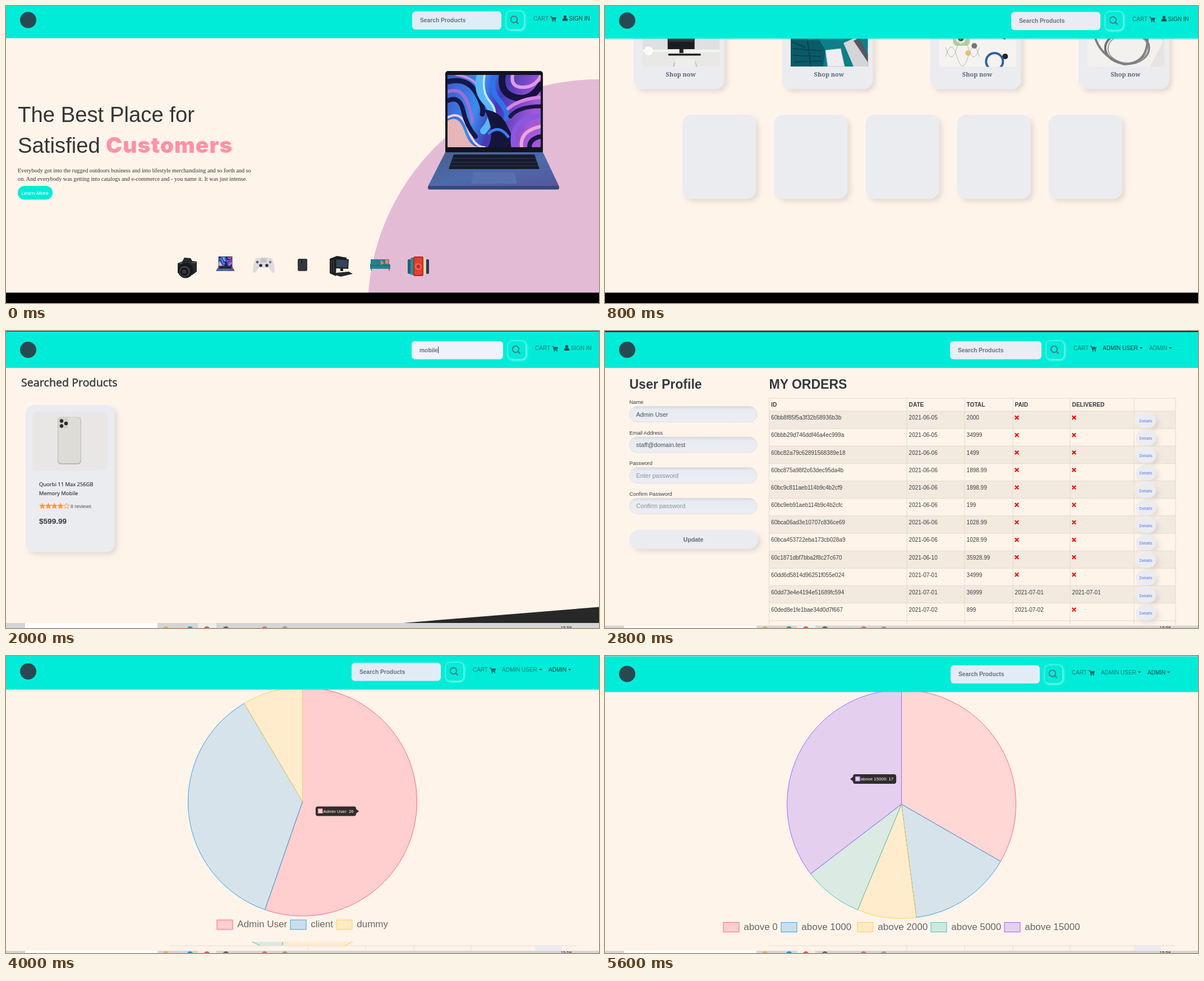
Recreate the animation shown at these times as an HTML page. Size 1057x530 px, loop 6 s.

```html
<!DOCTYPE html>
<html lang="en">
<head>
<meta charset="utf-8">
<title>Shop tour</title>
<style>
html, body { margin: 0; width: 100%; height: 100%; overflow: hidden; background: #fff4e9; }
#stage { display: block; width: 100%; height: 100%; font-family: "Liberation Sans", Arial, sans-serif; }
.b { font-weight: 700; }
.serif { font-family: "Liberation Serif", Georgia, serif; }
.slab { font-family: "Noto Serif", serif; font-weight: 700; }
.black { font-family: Inter, "Liberation Sans", sans-serif; font-weight: 900; letter-spacing: .026em; }
.hum { font-family: "Noto Sans", "Open Sans", sans-serif; font-weight: 500; stroke: #343a40; stroke-width: .02em; }
.mid { text-anchor: middle; }
</style>
</head>
<body>
<svg id="stage" viewBox="0 0 1057 530" preserveAspectRatio="none"></svg>
<script>
const TEAL = '#00ecd8', CREAM = '#fff4e9', PINK = '#e4bbd5', CARD = '#ebecf0', INK = '#343a40';
const STEP = 400, LOOP = 6000;

// ---- primitives
const R = (x, y, w, h, fill, rx = 0, more = '') =>
  `<rect x="${x}" y="${y}" width="${w}" height="${h}" rx="${rx}" fill="${fill}" ${more}/>`;
const C = (x, y, r, fill, more = '') => `<circle cx="${x}" cy="${y}" r="${r}" fill="${fill}" ${more}/>`;
const P = (d, fill, more = '') => `<path d="${d}" fill="${fill}" ${more}/>`;
const L = (d, color, w = 1) => P(d, 'none', `stroke="${color}" stroke-width="${w}" stroke-linecap="round"`);
const T = (x, y, s, size, fill = INK, cls = '') =>
  `<text x="${x}" y="${y}" font-size="${size}" fill="${fill}" class="${cls}">${s}</text>`;
const G = (tf, s) => `<g transform="${tf}">${s}</g>`;
const clip = (x, y, w, h, s) => `<svg x="${x}" y="${y}" width="${w}" height="${h}">${s}</svg>`;
const SOFT = 'filter="url(#soft)"';
const page = body => R(0, 0, 1057, 530, CREAM) + body;

const defs = `<defs>
<filter id="soft" x="-30%" y="-30%" width="170%" height="170%">
  <feDropShadow dx="-3" dy="-3" stdDeviation="3" flood-color="#fff" flood-opacity=".3"/>
  <feDropShadow dx="5" dy="5" stdDeviation="4.5" flood-color="#b9b2b4" flood-opacity=".4"/></filter>
<filter id="glow" x="-40%" y="-40%" width="180%" height="180%">
  <feDropShadow dx="1" dy="1" stdDeviation="2" flood-color="#c8fff8" flood-opacity=".8"/></filter>
<linearGradient id="field" x2="0" y2="1"><stop stop-color="#d3d8e2"/><stop offset=".2" stop-color="#e8ebf2"/><stop offset="1" stop-color="#eceef3"/></linearGradient>
<linearGradient id="metal" x2=".9" y2="1"><stop stop-color="#4a5d8c"/><stop offset=".55" stop-color="#4c6bab"/><stop offset="1" stop-color="#56579c"/></linearGradient>
<linearGradient id="wave" x2="1" y2=".25"><stop stop-color="#3f57c8"/><stop offset=".4" stop-color="#3a8cf0"/><stop offset=".6" stop-color="#4338b4"/><stop offset="1" stop-color="#a458d8"/></linearGradient>
</defs>`;

// ---- header and task bar
const cartIcon = (x, y) => G(`translate(${x} ${y})`,
  L('M.5 .8H2.4L4 7H9.5', '#1d5d5b', 1.3) + P('M2.6 1.8H11L9.8 6H3.6Z', '#1d5d5b') + C(4.5, 9, 1.1, '#1d5d5b') + C(9, 9, 1.1, '#1d5d5b'));
const userIcon = (x, y, c) => C(x, y - 2.4, 2.6, c) + P(`M${x - 4.6} ${y + 5}v-2q0-2.6 2.6-2.6h4q2.6 0 2.6 2.6v2z`, c);
const caret = (x, y) => P(`M${x} ${y}h5.6l-2.8 3z`, '#1d4d4a');

function header(h, { bx = 724, bw = 159, cx = 940, admin = false, dark = 2, typed = '', field = '#e2ecf6' } = {}) {
  const y = h - 47.5, nav = h - 31.4, gx = bx + bw + 23;
  const tone = n => n === dark ? '#17423f' : '#157a73';
  let s = R(0, 0, 1057, h + .4, TEAL) + C(39.5, h - 32, 14.5, '#274a52')
    + R(bx, y, bw, 32.5, field, 6)
    + T(bx + 14, h - 28, typed || 'Search Products', 10.25, '#67717e', 'b')
    + R(bx + bw + 8.5, y - .5, 32, 33, TEAL, 8, 'stroke="#6ff5e9" stroke-width=".8" filter="url(#glow)"')
    + C(gx - .5, h - 33, 5.7, 'none', 'stroke="#4a7f8a" stroke-width="2"')
    + L(`M${gx + 4} ${h - 28.5}l3 3`, '#4a7f8a', 2.2)
    + T(cx, nav, 'CART', 10, tone(1)) + cartIcon(cx + 30, nav - 7.5);
  if (typed) s += R(bx + 14.5 + typed.length * 5.45, h - 38, 1, 12, '#333');
  return s + (admin
    ? T(cx + 52, nav, 'ADMIN USER', 10, tone(2)) + caret(cx + 118, nav - 5)
      + T(cx + 135, nav, 'ADMIN', 10, tone(3)) + caret(cx + 170, nav - 5)
    : userIcon(cx + 56.5, nav - 4, '#1d4d4a') + T(cx + 63.5, nav, 'SIGN IN', 10, tone(2)));
}
const WIDE = { bx: 615, bw: 163, cx: 835, admin: true, dark: 3, field: '#e9edf4' };
const SLIM = { bx: 616, bw: 159, cx: 832, admin: true, dark: 3 };
const GUEST = { bx: 723, bw: 163, cx: 943, dark: 0, field: '#eef2fb' };

function taskbar(y, shift = 0) {
  const dots = [[285, '#d8b35c'], [328, '#2196b8'], [358, '#e2574c'], [392, '#5a6573'], [461, '#cf6e84'], [497, '#9a9a9a']];
  return clip(0, y, 1057, 530 - y, G(`translate(0 ${-y})`,
    R(0, y, 1057, 30, '#d5d5d5') + R(34, y, 236, 30, '#fff') + R(342, y, 33, 30, '#eee')
    + dots.map(([x, c]) => C(x, 532.5 + shift, 5.5, c)).join('') + T(988.5, 532 + shift, '15:58', 8, '#222')));
}

// ---- home page
const wallpaper = () => R(0, 0, 166, 129, 'url(#wave)')
  + P('M0 82Q20 70 30 100T58 129H0Z', '#e6b6b8') + L('M0 76Q24 62 36 96T66 129', '#e9d2e6', 4)
  + L('M0 12Q34 4 50 30T62 70', '#16184a', 9) + L('M0 30Q24 22 34 46T44 84', '#9a6fd8', 6) + L('M0 46Q22 36 28 64T50 110', '#17164a', 8)
  + L('M16 0Q48 4 60 28', '#d58ae0', 4) + L('M58 0Q50 30 70 50T64 100', '#58b8fa', 12) + L('M66 0Q60 30 76 48T78 92', '#c4e6ff', 4)
  + L('M84 0Q74 26 92 46T104 78', '#2c74ea', 9) + P('M66 62Q92 64 104 86T122 129H72Q86 104 66 62Z', '#15153c')
  + L('M74 104Q92 88 108 110', '#3d7cf2', 5) + L('M98 0Q92 32 120 40T166 18', '#16123e', 12) + L('M116 0Q112 22 134 22T166 2', '#e39be6', 6)
  + L('M108 60Q130 42 166 40', '#d884e4', 6) + L('M112 74Q126 56 166 56', '#1c1448', 7) + L('M118 129Q112 90 140 80T166 72', '#8a58e0', 9)
  + L('M132 129Q128 100 166 92', '#f0a4d4', 6) + L('M146 129Q146 114 166 110', '#1c1448', 8);

const laptop = () => R(783, 116, 174, 148, '#12141f', 5) + clip(787, 123, 166, 129, wallpaper())
  + P('M783 261H957L986 322H752Z', 'url(#metal)') + R(752, 321, 234, 6.5, '#34497c', 3)
  + P('M798 265H942L951 291H789Z', '#171b2c') + L('M796 272H945M794 279H947M792 285H949', '#3a4564', .8)
  + P('M834 297H906L911 317H829Z', '#5871ad');

const wares = () =>
  P('M306 459l8-3 4-7 11 1 3 5 8 1v18l-8 6-16 2-10-6z', '#26282b') + L('M309 459h6M331 458h7', '#55585c', 1.4)
  + C(320, 472, 13.5, '#17191b') + C(318.5, 473.5, 9.5, '#44484d') + C(318, 474, 7.5, '#15161a') + C(317.5, 474, 4, '#39304a')
  + G('translate(267.5 432.5) scale(.142 .124)', laptop())
  + P('M446 450q14-3 27 0 6 8 6 23-1 5-5 2l-6-8h-17l-6 8q-4 3-5-2 0-15 6-23z', '#dcdcde') + R(454, 450, 11, 8, '#c5c5c9', 2)
  + C(454, 463, 2.8, '#333') + C(465, 463, 2.8, '#333') + C(448, 457, 2.2, '#555') + C(471, 457, 2.2, '#777')
  + R(520, 451, 17, 22, '#33363c', 2.5) + R(522, 453, 6, 6, '#1b1c20', 1.5) + C(524, 455, 1, '#777') + C(524, 457.5, 1, '#777')
  + P('M577 451l13-5 17 3v5l-18 2-1 26-11-5z', '#1d1f22') + L('M580 454v20M584 453v22', '#4a4d52', 1)
  + P('M587 450l24 2-1 17-23-1z', '#15171b') + P('M588.5 452l21 1.5-1 13.5-20-1z', '#34445a') + R(596, 468, 5, 5, '#222')
  + P('M589 476l22-2 7 4-21 5-11-3z', '#26282b')
  + P('M650 452h33v9h2v8h-36v-9h1z', '#26808a') + L('M651 469v3M683 469v3', '#134') + P('M668 453l6 6-6 3zM676 453h6v7h-6z', '#e8825f') + L('M650 463H684', '#175c66', 1.2)
  + R(716, 452, 10, 26, '#1f5f80', 2) + R(721, 449, 9, 31, '#2f8d84', 2) + R(744, 452, 10, 26, '#27395c', 2) + R(740, 449, 9, 31, '#e6d3ae', 2)
  + R(726, 447, 18, 35, '#b3232a', 3) + R(727.5, 449, 15, 31, '#e0402f', 2) + C(735, 465, 6, '#ee6a48') + C(735, 465, 3.5, '#c42a2c');

const ellipse = (x, y, rx, ry, c, w) => `<ellipse cx="${x}" cy="${y}" rx="${rx}" ry="${ry}" fill="none" stroke="${c}" stroke-width="${w}"/>`;
const photos = [
  R(0, 0, 138, 110, '#dfe0e1') + R(0, 80, 138, 30, '#e9e8e6') + P('M0 80H138V84H0Z', '#f4f4f3') + R(13, 10, 13, 22, '#f4f4f4') + R(15, 18, 9, 12, '#555')
  + R(119, 14, 15, 28, '#3a3a3a') + R(121, 16, 8, 10, '#ddd') + L('M0 13H110', '#f6f6f6', 2.5) + L('M56 0V14M92 0V14', '#c9c9c9')
  + R(45, 47, 48, 32, '#1c1d20') + R(47, 56, 44, 10, '#303338') + R(66, 79, 7, 7, '#222') + R(46, 87, 58, 3.5, '#222', 1) + C(11, 82, 8, '#fafafa')
  + L('M55 110l6-14h18M97 110l-5-14', '#cdbfae', 2) + R(58, 95, 36, 15, '#efedea', 4),
  R(0, 0, 138, 110, '#0c7f8b') + P('M2 0h16l24 22-6 11L10 20z', '#ded9d6') + P('M44 0h18l10 20-10 10-16-16z', '#d0cbc8')
  + P('M0 54l22-5 10 14 18-2 12 20-4 29H0z', '#0b5a69') + L('M2 66l24 10M4 78l50 4M4 90l50 2M6 102l50-2M30 64l6 46', '#083f4c', 1.6)
  + C(66, 37, 18, 'none', 'stroke="#0a3447" stroke-width="6"') + P('M76 34l14 9-8 15-12-6z', '#082736') + P('M102 22l18-8 14 16-18 14-16-6z', '#3ccfca')
  + C(126, 8, 6, '#4bd0cd') + P('M94 68l22-10 22 42v10h-26z', '#d3d5d8') + P('M112 64l10-5 16 30v14z', '#55585e') + P('M62 81l27-3 7 32H66z', '#eeeef0', 'stroke="#b9bec4"'),
  R(0, 0, 138, 110, '#f5f3ef') + P('M60 0h66l-8 62-66-24z', '#1d1d20') + P('M64 8l56 14-3 16-55-15z', '#38393d') + L('M64 13l54 14M63 18l54 14', '#1d1d20')
  + P('M70 28l18 6-3 10-18-6z', '#2e2f33') + C(26, 22, 8.5, '#3a2c24', 'stroke="#fff" stroke-width="2"') + R(25, 47, 30, 26, '#b3cda0', 8)
  + C(39, 60, 9, '#e5ead8') + C(39, 60, 5, '#444') + R(34, 47, 10, 4, '#eee')
  + L('M12 92q10-34 20 0t20 0 20 0M12 76q10 34 20 0t20 0 20 0', '#aaa', .8) + C(52, 86, 5, '#e0c36d') + C(63, 73, 5, '#777')
  + C(99, 101, 15, 'none', 'stroke="#2d62a0" stroke-width="4"') + C(118, 92, 5, '#223'),
  R(0, 0, 138, 110, '#f3f1ee') + P('M20 0H138V66L100 40z', '#dcdcdb') + P('M30 4l52 30M44 2l44 26', '#ddd', 'stroke="#c4c4c4"') + P('M138 60V110H112z', '#e6e4e2')
  + R(84, -12, 48, 44, '#77757a', 6) + R(89, -6, 39, 29, '#e9e9ec') + C(108, 27.5, 3, '#ccc')
  + ellipse(71, 77, 39, 28, '#737376', 4) + ellipse(73, 78, 36, 26, '#a3a3a5', 2)
  + L('M32 18Q4 34 16 64T66 106Q112 104 107 50', '#808083', 4) + P('M30 12l11 5-6 10-9-7z', '#6d6d70') + R(103, 32, 8, 20, '#707073', 2)
];
const cardTitles = ['Trending Now', 'Holiday Deals', 'Upto 50% off', 'Drel Basics'];

function home(scroll, h, opts) {
  const hero = clip(0, 0, 1057, 512, C(1057, 543, 412.3, PINK)) + laptop()
    + T(21, 206.5, 'The Best Place for', 38.3, '#343638') + T(21, 262, 'Satisfied', 38.3, '#343638') + T(178, 262, 'Customers', 39, '#ff91aa', 'black')
    + T(21, 297, 'Everybody got into the rugged outdoors business and into lifestyle merchandising and so forth and so', 10.25, '#333', 'serif')
    + T(21, 311.5, 'on. And everybody was getting into catalogs and e-commerce and - you name it. It was just intense.', 10.25, '#333', 'serif')
    + R(21, 321, 62, 24.5, TEAL, 12) + T(51.5, 336.5, 'Learn More', 9.5, '#fff', 'mid') + wares();
  const cards = cardTitles.map((t, i) => {
    const x = 51 + 264.3 * i;
    return R(x, 604, 162, 184, CARD, 16, SOFT) + T(x + 84.5, 628.5, t, 10.7, '#5d6675', 'b mid')
      + clip(x + 15.7, 638, 137.5, 110.5, photos[i]) + T(x + 84, 766, 'Shop now', 10.9, '#5d6675', 'slab mid');
  }).join('');
  const minis = [0, 1, 2, 3, 4].map(i => R(138 + 163.2 * i, 834, 131, 150, CARD, 16, SOFT)).join('');
  return page(G(`translate(0 ${-scroll})`, hero + cards + minis) + header(h, opts));
}
const floor = R(0, 511.5, 1057, 19, '#000');
const seam = R(0, 504, 1057, 8, CREAM) + R(645.5, 504.5, 412, 8, PINK);

// ---- order tables
const who = { A: 'Admin User', c: 'client', L: 'Luke Fen' };
const orders = `60bb8f85f5a3f32b58936b3b A 06-05 2000
60bbb29d746ddf46a4ec999a A 06-05 34999
60bbb4d6746ddf46a4ec999c L 06-05 34999
60bc6b882796f93270b0ed6b c 06-06 34999
60bc721c87955525ac77cd7d c 06-06 19999
60bc735587955525ac77cd7f c 06-06 399.99
60bc7ae297e72c3e5c2a87ba c 06-06 5929.99
60bc7ea297e72c3e5c2a87c3 c 06-06 34999
60bc815697e72c3e5c2a87c7 c 06-06 5000
60bc82a79c62891568389e18 A 06-06 1499
60bc875a98f2c63dec95da4b A 06-06 1898.99
60bc9c811aeb114b9c4b2cf9 A 06-06 1898.99
60bc9eb91aeb114b9c4b2cfc A 06-06 199
60bca06ad3e10707c836ce69 A 06-06 1028.99
60bca453722eba173cb028a9 A 06-06 1028.99
60c1871dbf7bba2f8c27c670 A 06-10 35928.99
60dd6d5814d96251f055e024 A 07-01 34999
60dd73e4e4194e51689fc594 A 07-01 36999 07-01 07-01
60ded8e1fe1bae34d0d7f667 A 07-02 899 07-02`.split('\n').map(r => {
  const [id, user, date, total, paid, sent] = r.split(' '), day = d => d && '2021-' + d;
  return { ID: id, USER: who[user], DATE: day(date), TOTAL: total, PAID: day(paid), DELIVERED: day(sent) };
});
const cross = (x, y) => L(`M${x - 2.6} ${y - 2.6}l5.2 5.2m0-5.2l-5.2 5.2`, '#f00d0d', 2.2);

function table(xs, heads, top, pitch, rows, btn, hover) {
  const body = top + 23, x0 = xs[0], x1 = xs[xs.length - 1], line = '#e4dacf';
  let s = '', lines = `M${x0} ${top}H${x1}M${x0} ${body}H${x1}`;
  rows.forEach((row, i) => {
    const y = body + pitch * i;
    if (i === hover || i % 2 === 0) s += R(x0, y, x1 - x0, pitch, i === hover ? '#ebe2d9' : '#f2e9df');
    lines += `M${x0} ${y + pitch}H${x1}`;
    heads.forEach((k, j) => {
      s += row[k] ? T(xs[j] + 3.6, y + 15.3, row[k], 10, '#3c4043') : cross(xs[j] + 7, y + 11.5);
    });
    s += R(btn - 18, y + 4, 36, 26, CARD, 13, SOFT) + T(btn, y + 20, 'Details', 7.5, '#5f74ea', 'mid');
  });
  xs.forEach(x => lines += `M${x} ${top}V530`);
  return s + L(lines, line) + heads.map((k, j) => T(xs[j] + 3.6, top + 15, k, 10.1, INK, 'b')).join('');
}

const allOrders = () => page(T(33, 104.5, 'Orders', 28.7, INK, 'b')
  + table([3, 317.5, 450, 581, 691, 821.5, 966.5, 1057], ['ID', 'USER', 'DATE', 'TOTAL', 'PAID', 'DELIVERED'], 129, 31.85, orders.slice(0, 12), 1015, 1)
  + header(63.5, WIDE) + taskbar(519.5, -3) + R(0, 527, 1057, 3, '#000'));

function profile(dy) {
  const fields = [['Name', 'Admin User'], ['Email Address', 'staff@domain.test'], ['Password', 'Enter password'], ['Confirm Password', 'Confirm password']];
  const form = fields.map(([label, value], i) => {
    const y = 136 + 54.6 * i;
    return T(43.5, y, label, 9.3) + R(43.5, y + 4.5, 227.5, 28, 'url(#field)', 14, 'stroke="#e0dfe2"')
      + T(55.5, y + 22.5, value, 10.9, i < 2 ? '#495057' : '#8a9097');
  }).join('');
  const mine = orders.filter(o => o.USER === who.A);
  return page(G(`translate(0 ${dy})`, T(43.5, 108.5, 'User Profile', 23, INK, 'b') + form
    + R(43, 361, 230, 33.5, CARD, 17, SOFT) + T(157.5, 382, 'Update', 10.6, '#636a75', 'b mid')
    + T(292.5, 108.5, 'MY ORDERS', 23, INK, 'b')
    + table([292.5, 538, 641, 727, 829, 943, 1017], ['ID', 'DATE', 'TOTAL', 'PAID', 'DELIVERED'], 126, 31.15, mine, 964))
    + header(71.5 + dy, { ...WIDE, dark: 2 })
    + R(0, 0, 1057, Math.max(0, 8 + dy), '#2b2d30') + (dy ? '' : R(184, -8, 790, 13, '#1c1d20', 6) + C(1023, -2, 5, '#b3174a'))
    + taskbar(525.5));
}

// ---- search results
const star = (x, y, fill) => {
  let d = '';
  for (let i = 0; i < 10; i++) {
    const a = i * Math.PI / 5, r = i % 2 ? 2.4 : 5.2;
    d += `${i ? 'L' : 'M'}${x + r * Math.sin(a)} ${y - r * Math.cos(a)}`;
  }
  return P(d + 'Z', fill, 'stroke="#ff9a3c" stroke-width=".9"');
};
const results = dy => page(G(`translate(0 ${dy})`,
  T(27, 99, 'Searched Products', 19.6, INK, 'hum')
  + R(35, 132, 158.5, 262, CARD, 14, SOFT) + R(47, 144, 134.5, 105.5, '#e8e7e6', 9)
  + R(92, 153.5, 42, 84.5, '#b9b8b0', 6) + R(93, 154, 40, 82, '#dedcd6', 6) + R(94.5, 155, 17, 19, '#d2d0ca', 5)
  + C(99, 160.5, 3.2, '#2b2b2b') + C(99, 169.5, 3.2, '#2b2b2b') + C(107, 165, 3.2, '#2b2b2b')
  + T(59, 277, 'Quorbi 11 Max 256GB', 9.4, INK, 'hum') + T(59, 292.5, 'Memory Mobile', 9.4, INK, 'hum')
  + [0, 1, 2, 3, 4].map(i => star(64.7 + 10.8 * i, 312.5, i < 4 ? '#ff9a3c' : 'none')).join('')
  + T(115, 315.5, '8 reviews', 8.8, '#555') + T(59, 343.5, '$599.99', 13.6, INK, 'b')
  + P('M708 521L1057 492.5V620H0V580Z', '#282828'))
  + header(65.5, { ...GUEST, typed: 'mobile' }) + R(0, 0, 1057, 1, '#333') + taskbar(521));

// ---- pie charts
const hues = ['255,99,132', '54,162,235', '255,206,86', '75,192,192', '153,102,255'];
const CX = 528.5, RAD = 204;

function pie(cy, values, hot) {
  const sum = values.reduce((a, b) => a + b), pt = (t, r) => [CX + r * Math.sin(t), cy - r * Math.cos(t)];
  let a = 0, s = '', tip;
  values.forEach((v, i) => {
    const b = a + v / sum * 2 * Math.PI;
    s += P(`M${CX} ${cy}L${pt(a, RAD)}A${RAD} ${RAD} 0 ${b - a > Math.PI ? 1 : 0} 1 ${pt(b, RAD)}Z`,
      `rgba(${hues[i]},${i === hot ? .26 : .2})`, `stroke="rgb(${hues[i]})"`);
    if (i === hot) tip = pt((a + b) / 2, RAD / 2);
    a = b;
  });
  return { s, tip };
}
function tooltip([x, y], text, i) {
  const w = 4.9 * text.length + 3.6, right = x > CX, left = right ? x - 5 - w : x + 5, d = right ? -5 : 5;
  return R(left, y - 8.5, w, 17, '#322c2b', 4) + P(`M${x} ${y}l${d}-4v8z`, '#322c2b')
    + R(left + 4, y - 4.5, 8.5, 8.5, '#fff') + R(left + 4.5, y - 4, 7.5, 7.5, `rgba(${hues[i]},.3)`, 0, `stroke="rgb(${hues[i]})" stroke-width=".7"`)
    + T(left + 13.7, y + 2.7, text, 7.85, '#fff');
}
const buyers = { values: [26, 17, 4], names: ['Admin User', 'client', 'dummy'], at: [376, 507, 589] };
const totals = { values: [16, 7, 4, 4, 17], names: [0, 1000, 2000, 5000, 15000].map(n => 'above ' + n), at: [211, 314, 450, 581, 712] };
const stock = { values: [22, 14, 17, 27, 20], names: [], at: [] };

function chart(cy, h, data, hot, under = '') {
  const { s, tip } = pie(cy, data.values, hot);
  const legend = data.names.map((n, i) =>
    R(data.at[i], cy + 211, 28, 17, `rgba(${hues[i]},.26)`, 0, `stroke="rgb(${hues[i]})"`) + T(data.at[i] + 36.3, cy + 224.3, n, 17, '#666')).join('');
  return page(s + legend + (tip ? tooltip(tip, `${data.names[hot]}: ${data.values[hot]}`, hot) : '') + under
    + R(0, 517, 1057, 10, CREAM) + L('M292 517H1017M538 517V526M641 517V526M727 517V526M829 517V526', '#e4dacf') + R(943, 517, 48, 9, CARD)
    + header(h, SLIM) + taskbar(526));
}
const sliver = clip(0, 510, 1057, 7, G('translate(0 -510)', pie(327, stock.values).s));
const topLine = R(0, 0, 1057, 1, '#a9d6d2');

// one still per step
const scenes = [
  home(0, 57) + floor,
  home(342.5, 58, { field: '#e9ecf2' }) + seam + floor,
  home(640, 58, { field: '#e9ecf2' }) + floor,
  allOrders(),
  home(-8, 65.5, { ...GUEST, typed: 'mob' }) + R(0, 0, 1057, 1, '#333') + taskbar(521),
  results(0),
  results(-12),
  profile(-6),
  profile(0),
  chart(327, 59, stock),
  chart(260, 59.5, buyers, 0, sliver),
  chart(260, 59.5, buyers, 1),
  chart(262, 62, totals, 0),
  chart(264.5, 64, totals, 1),
  chart(264.5, 64, totals, 4) + topLine
];

const stage = document.getElementById('stage');
stage.innerHTML = defs + scenes.map(s => `<g class="scene" display="none">${s}</g>`).join('');
const layers = [...stage.querySelectorAll('.scene')];
const start = performance.now();
let shown = -1;

function tick() {
  const i = Math.floor((performance.now() - start) % LOOP / STEP);
  if (i !== shown) {
    if (shown >= 0) layers[shown].setAttribute('display', 'none');
    layers[i].removeAttribute('display');
    shown = i;
  }
  requestAnimationFrame(tick);
}
tick();
</script>
</body>
</html>
```
